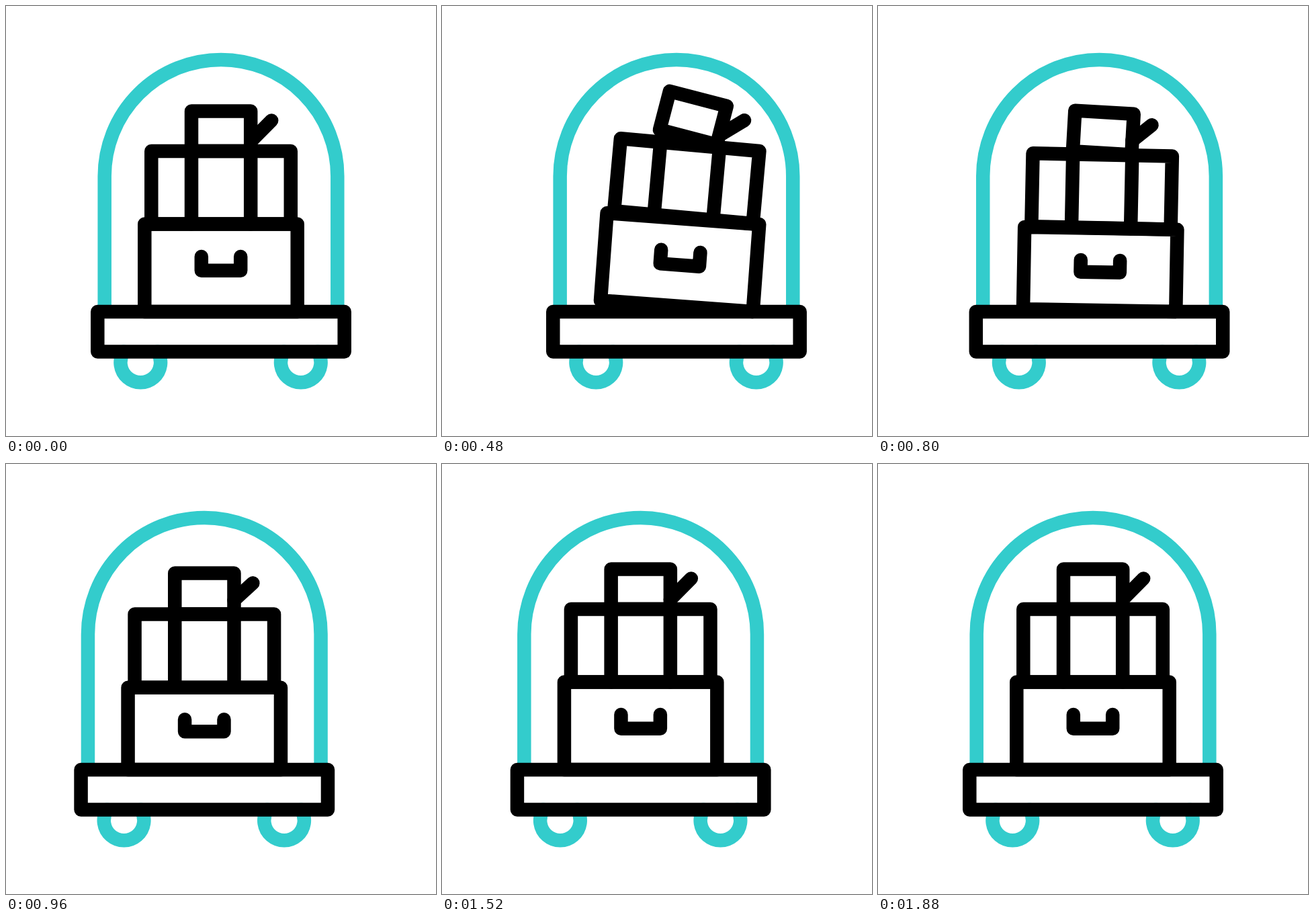
Recreate the animation shown at these times as an HTML page. Size 640x640 px, loop 2 s.

```html
<!DOCTYPE html>
<html lang="en">
<head>
<meta charset="utf-8">
<title>Luggage cart</title>
<style>
  html, body { margin: 0; width: 100%; height: 100%; overflow: hidden; background: #fff; }
  svg { display: block; width: 100vw; height: 100vh; }
  path { fill: none; stroke: #000; stroke-width: 20.5; stroke-linecap: round; stroke-linejoin: round; }
  .teal { stroke: #33cccc; }
  .arch { stroke-linecap: butt; }
</style>
</head>
<body>
<svg viewBox="0 0 640 640">
  <g id="cart">
    <path class="teal arch" d="M146.7 455V253.2a173.3 173.3 0 0 1 346.6 0V455"/>
    <path class="teal" d="M175.2 514.5A29.8 29.8 0 1 0 225.4 514.5"/>
    <path class="teal" d="M413.7 514.5A29.8 29.8 0 1 0 463.9 514.5"/>
    <g id="bags"></g>
    <path d="M136.3 455H503.7V514.5H136.3Z"/>
  </g>
</svg>
<script>
const LOOP = 2000, STEP = 40;
const cart = document.getElementById('cart');
const bags = document.getElementById('bags');

const box = (l, t, r, b) => [[l, t], [r, t], [r, b], [l, b]];

// Tilt pose: turn by deg about a pivot, then shift.
const turn = (px, py, deg, sx = 0, sy = 0) => ([x, y]) => {
  const a = deg * Math.PI / 180, c = Math.cos(a), s = Math.sin(a);
  return [px + sx + (x - px) * c - (y - py) * s,
          py + sy + (x - px) * s + (y - py) * c];
};

// Squash pose: points at height y0 drop by d0, those at y1 by d1.
const press = (y0, d0, y1, d1) => ([x, y]) =>
  [x, y + d0 + (d1 - d0) * (y - y0) / (y1 - y0)];

const parts = [];
function part(rest, tilt, squash, closed) {
  const el = document.createElementNS('http://www.w3.org/2000/svg', 'path');
  bags.append(el);
  parts.push({ el, rest, tilted: rest.map(tilt), squashed: rest.map(squash), end: closed ? 'Z' : '' });
}

const lowTilt = turn(433.7, 455, 4.87);
const midTilt = turn(423.8, 324.5, 5.98, 11.4, -0.6);
const topTilt = turn(364.2, 216, 16.9, 18.1, -11.1);
const midPress = press(216, 9.5, 324.5, 10.2);

part(box(276, 156.4, 364.2, 216), topTilt, press(156.4, 7.5, 216, 9.5), true);
part([[364.2, 201.6], [395.2, 170.4]],
  ([x, y]) => y > 200 ? [387.1, 191] : [425.1, 170.2],
  ([x, y]) => y > 200 ? [x, y + 1.3] : [x - 3.9, y + 8.5]);
part(box(216.3, 216, 423.8, 324.5), midTilt, midPress, true);
for (const x of [276, 364.2]) part([[x, 216], [x, 324.5]], midTilt, midPress);
part(box(206.3, 324.5, 433.7, 455), lowTilt, press(324.5, 10.2, 455, 0), true);
part([[290.8, 373], [290.8, 393.7], [349.2, 393.7], [349.2, 373]],
  lowTilt, press(373, 9.1, 393.7, 5.6));

const ease = x => x * x * (3 - 2 * x);

// Eased value at time t from [time, value] keys.
function tween(t, keys) {
  if (t <= keys[0][0]) return keys[0][1];
  for (let i = 1; i < keys.length; i++) {
    const [t0, v0] = keys[i - 1], [t1, v1] = keys[i];
    if (t < t1) return v0 + (v1 - v0) * ease((t - t0) / (t1 - t0));
  }
  return keys[keys.length - 1][1];
}

const slide = [[80, 0], [600, 33.5], [1160, -48.7], [1880, 0]];
const tilting = [[80, 0], [600, 1], [880, 0]];
const squashing = [[600, 0], [880, 1], [1160, 0]];

function draw(now) {
  const t = Math.floor(now % LOOP / STEP) * STEP;
  const a = tween(t, tilting), s = tween(t, squashing);
  cart.setAttribute('transform', `translate(${tween(t, slide)})`);
  for (const { el, rest, tilted, squashed, end } of parts) {
    const points = rest.map((p, i) => p.map((v, k) =>
      (v + a * (tilted[i][k] - v) + s * (squashed[i][k] - v)).toFixed(2)));
    el.setAttribute('d', 'M' + points.join('L') + end);
  }
}

const start = performance.now();
function tick() {
  draw(performance.now() - start);
  requestAnimationFrame(tick);
}
tick();
</script>
</body>
</html>
```
